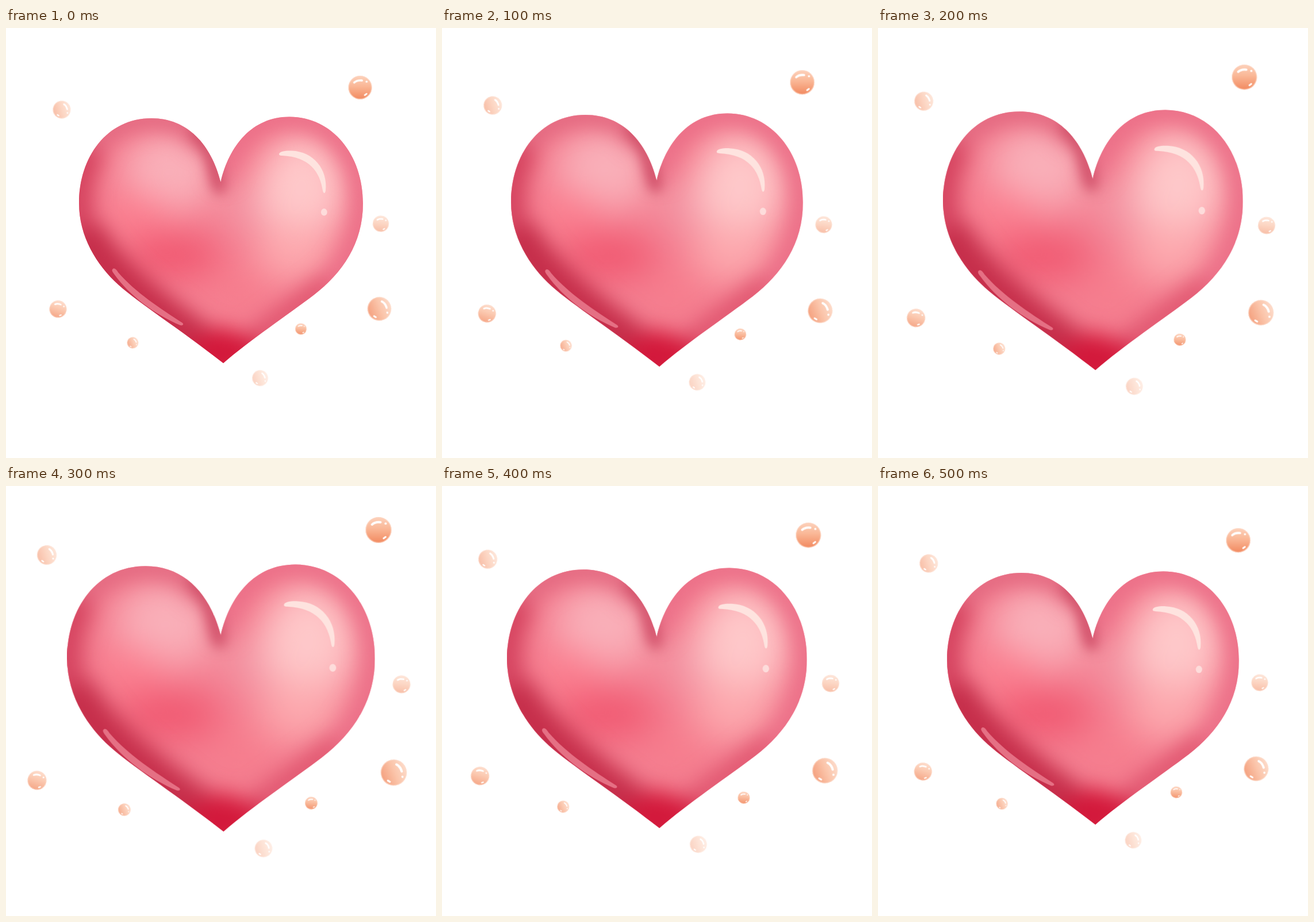
An HTML page without scripts that plays this animation: 748 px wide and 748 px high, repeating every 0.6 s.

```html
<!DOCTYPE html>
<html lang="en">
<head>
<meta charset="utf-8">
<title>Beating heart</title>
<style>
  html, body { margin: 0; width: 100%; height: 100%; overflow: hidden; background: #fff; }
  svg { display: block; width: 100vw; height: 100vh; }

  /* Three even steps out, three back */
  .heart, .drift { animation: beat .6s steps(3, end) infinite; }
  .heart { --grow: 1.084; transform-origin: 374px 368px; }
  .drift { --grow: 1.1; transform-origin: 0 0; }
  @keyframes beat {
    0%, 100% { transform: translate(0, 0) scale(1); }
    50% { transform: translate(var(--dx, 0px), var(--dy, 0px)) scale(var(--grow)); }
  }
</style>
</head>
<body>
<svg viewBox="0 0 748 748">
  <defs>
    <path id="shape" d="M373.5 268C357 203 316 157 253 157C175 157 127 225 127 305C127 362 157 412 196 447C232 479 300 522 378 583C424 543 490 499 536 464C585 426 621 375 621 305C621 221 568 154.5 493 154.5C428 154.5 388 205 373.5 268Z"/>
    <clipPath id="clip"><use href="#shape"/></clipPath>

    <filter id="soft" filterUnits="userSpaceOnUse" x="0" y="0" width="748" height="748" color-interpolation-filters="sRGB">
      <feGaussianBlur stdDeviation="30"/>
    </filter>
    <filter id="edge" filterUnits="userSpaceOnUse" x="0" y="0" width="748" height="748" color-interpolation-filters="sRGB">
      <feGaussianBlur stdDeviation="17"/>
    </filter>
    <filter id="crease" filterUnits="userSpaceOnUse" x="0" y="0" width="748" height="748" color-interpolation-filters="sRGB">
      <feGaussianBlur stdDeviation="11"/>
    </filter>

    <linearGradient id="peach" x1="0" y1="0" x2="0" y2="1">
      <stop offset="0" stop-color="#fdd2bc"/>
      <stop offset=".45" stop-color="#fab796"/>
      <stop offset="1" stop-color="#f28a60"/>
    </linearGradient>

    <!-- Bubble with a radius of 20 -->
    <g id="bubble">
      <circle r="20" fill="url(#peach)"/>
      <circle r="19.4" fill="none" stroke="#fcd3bf" stroke-width="1.2" opacity=".7"/>
      <g fill="none" stroke="#fff" stroke-linecap="round">
        <path d="M-10-8.5Q-5-13 3-12" stroke-width="3.6"/>
        <path d="M11-10h.1" stroke-width="3.4"/>
        <path d="M8 13L11 10.8" stroke-width="2.8"/>
      </g>
    </g>
  </defs>

  <g class="heart">
    <g clip-path="url(#clip)">
      <rect x="100" y="130" width="548" height="480" fill="#f57f91"/>
      <g filter="url(#soft)">
        <ellipse cx="285" cy="250" rx="82" ry="72" fill="#f9b0b9"/>
        <ellipse cx="420" cy="315" rx="50" ry="45" fill="#f293a2"/>
        <ellipse cx="515" cy="280" rx="78" ry="95" fill="#fec8c9"/>
        <ellipse cx="500" cy="390" rx="68" ry="50" fill="#fca9ae"/>
        <ellipse cx="228" cy="325" rx="55" ry="35" fill="#fb7d8e"/>
        <ellipse cx="290" cy="396" rx="82" ry="36" fill="#f0566f"/>
        <ellipse cx="405" cy="455" rx="55" ry="35" fill="#f67d8d"/>
      </g>
      <g fill="none" filter="url(#edge)">
        <path d="M536 464C585 426 621 375 621 305C621 221 568 154.5 493 154.5C428 154.5 388 205 373.5 268" stroke="#ea6c86" stroke-width="34"/>
        <path d="M378 583C424 543 490 499 560 445" stroke="#e0556f" stroke-width="40"/>
        <path d="M350 205C325 170 295 157 253 157C210 157 165 180 145 220" stroke="#e2677f" stroke-width="38"/>
        <path d="M150 210C118 260 120 320 138 366" stroke="#d5435f" stroke-width="54"/>
        <path d="M130 355C157 412 220 475 378 583" stroke="#c62f4b" stroke-width="80"/>
        <path d="M320 560L378 530L440 560L378 610Z" fill="#d3193b" stroke="#d3193b" stroke-width="20"/>
      </g>
      <path d="M330 180C352 205 363 235 371 278" fill="none" stroke="#cb4761" stroke-width="20" stroke-linecap="round" filter="url(#crease)"/>
    </g>
    <path d="M475 219C476 214 488 213 497 213.5C535 215 560 246 556 283C555 289 552 288 551 283C546 250 528 224 480 222C476 222 475 221 475 219Z" fill="#fee3df"/>
    <ellipse cx="553.3" cy="320.3" rx="5.4" ry="6.2" fill="#fddcdb"/>
    <path d="M185 420C188 416 192 420 195 425C225 460 270 489 307 513C310 516 307 518 303 517C260 499 215 466 188 428C185 424 184 422 185 420Z" fill="#e57084"/>
  </g>

  <g transform="translate(97 142)"><g class="drift" style="--dx:-26px;--dy:-22px"><use href="#bubble" transform="rotate(72) scale(.77)" opacity=".55"/></g></g>
  <g transform="translate(616 103.5)"><g class="drift" style="--dx:32px;--dy:-27px"><use href="#bubble" transform="scale(1.02)"/></g></g>
  <g transform="translate(652 340.5)"><g class="drift" style="--dx:36px;--dy:4.5px"><use href="#bubble" transform="rotate(8) scale(.7)" opacity=".55"/></g></g>
  <g transform="translate(649.5 488.5)"><g class="drift" style="--dx:25px;--dy:10px"><use href="#bubble" transform="rotate(68) scale(1.03)" opacity=".8"/></g></g>
  <g transform="translate(513 523.5)"><g class="drift" style="--dx:18px;--dy:28px"><use href="#bubble" transform="rotate(5) scale(.49)" opacity=".9"/></g></g>
  <g transform="translate(442 609)"><g class="drift" style="--dx:6px;--dy:21.5px"><use href="#bubble" transform="rotate(72) scale(.69)" opacity=".38"/></g></g>
  <g transform="translate(220.5 547.5)"><g class="drift" style="--dx:-14.5px;--dy:15.5px"><use href="#bubble" transform="rotate(68) scale(.49)" opacity=".7"/></g></g>
  <g transform="translate(90.5 489)"><g class="drift" style="--dx:-36.5px;--dy:23px"><use href="#bubble" transform="rotate(18) scale(.75)" opacity=".75"/></g></g>
</svg>
</body>
</html>
```
